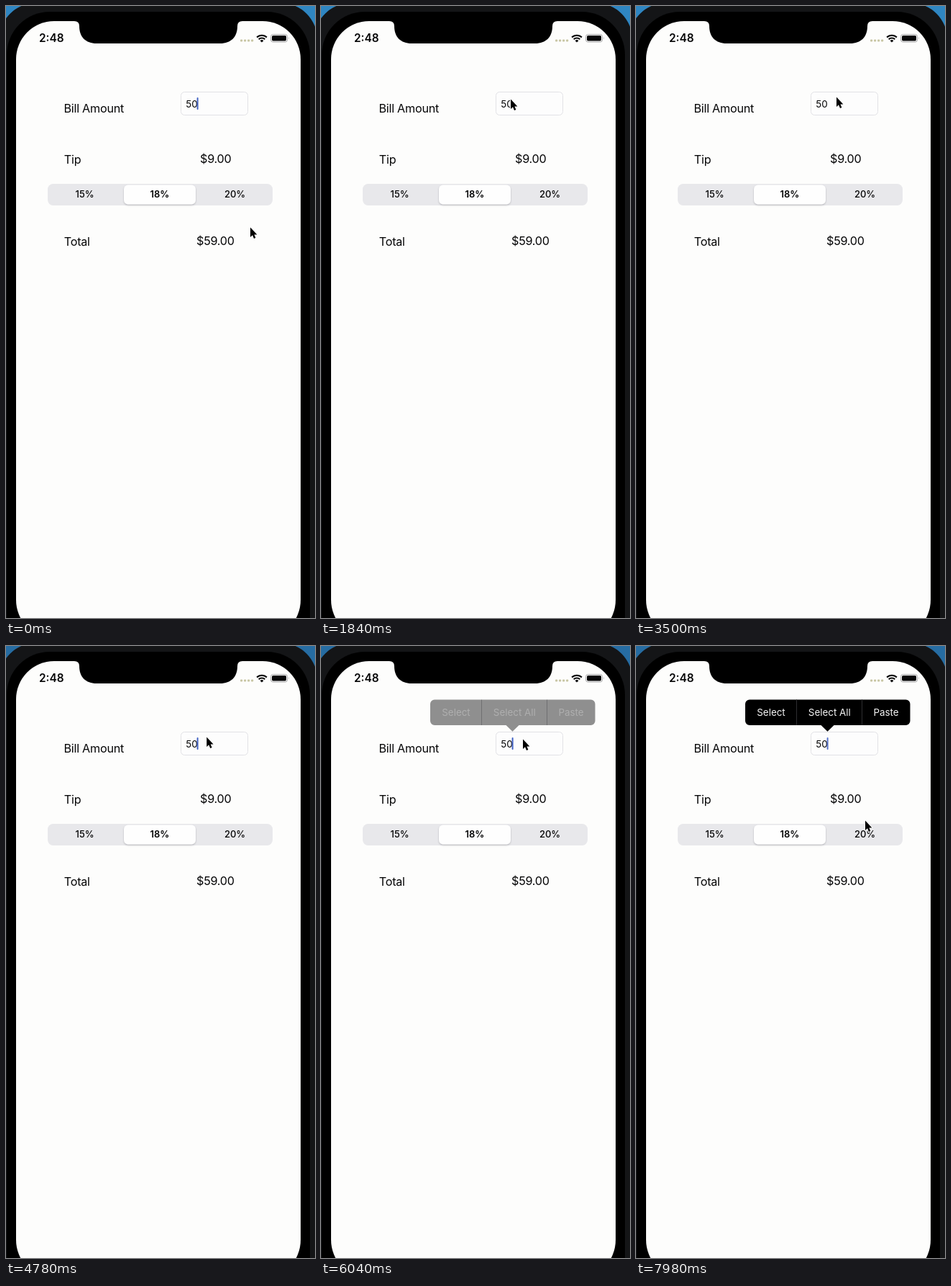
Recreate the animation shown at these times as an HTML page. Size 430x850 px, loop 8 s.

```html
<!DOCTYPE html>
<html lang="en">
<head>
<meta charset="utf-8">
<title>Tip calculator</title>
<style>
  html, body { margin: 0; width: 100%; height: 100%; overflow: hidden; background: #000; }
  svg { display: block; width: 430px; height: 850px; }
  text { font-family: Inter, Roboto, "Liberation Sans", sans-serif; fill: #050506; }
  .label { font-size: 16.2px; letter-spacing: -.26px; }
  .seg { font-size: 13px; font-weight: 500; text-anchor: middle; }
  .seg.on { font-weight: 600; }
  .small { font-size: 13.4px; }
  .clock { font-size: 15.4px; font-weight: 600; }
  #menuText text { fill: #f4f4f4; text-anchor: middle; }
</style>
</head>
<body>
<svg viewBox="0 0 430 850">
  <defs>
    <radialGradient id="glow">
      <stop offset="0" stop-color="#f1f1f5"/>
      <stop offset="1" stop-color="#fdfdfc" stop-opacity="0"/>
    </radialGradient>
    <filter id="lift" x="-10%" y="-20%" width="120%" height="150%">
      <feDropShadow dx="0" dy="1.2" stdDeviation=".8" flood-color="#50505a" flood-opacity=".35"/>
    </filter>
  </defs>

  <!-- device -->
  <rect id="desk" width="430" height="850"/>
  <rect x="-9" y="-4" width="442" height="920" rx="50" fill="#141517"/>
  <rect x="1" y="8" width="422" height="900" rx="60" fill="#000"/>
  <rect x="14" y="21" width="396" height="857" rx="53" fill="#fdfdfc"/>
  <path d="M95 20V21Q102 21 102 28C102 43 111 52 126 52H298C313 52 322 43 322 28Q322 21 329 21V20Z"/>

  <!-- status bar -->
  <text class="clock" x="46" y="50.3">2:48</text>
  <g fill="#c8c6a4">
    <rect x="326" y="46.5" width="3.2" height="3" rx="1"/>
    <rect x="331" y="46.5" width="3.2" height="3" rx="1"/>
    <rect x="336" y="46.5" width="3.2" height="3" rx="1"/>
    <rect x="341" y="46.5" width="3.2" height="3" rx="1"/>
  </g>
  <g fill="none" stroke="#050506" stroke-width="2.1">
    <path d="M349.1 43.6A9.8 9.8 0 0 1 362.9 43.6"/>
    <path d="M351.7 46.3A6.1 6.1 0 0 1 360.3 46.3"/>
    <path d="M353.6 48.2A3.4 3.4 0 0 1 358.4 48.2L356 50.6Z" fill="#050506" stroke="none"/>
  </g>
  <rect x="368.5" y="39.5" width="23" height="10.5" rx="3" fill="none" stroke="#a8a8aa"/>
  <rect x="370" y="41" width="20" height="7.5" rx="1.7" fill="#050506"/>
  <path d="M393 43Q394.6 44.7 393 46.5Z" fill="#a8a8aa"/>

  <!-- form -->
  <ellipse id="press" cx="267" cy="129" rx="52" ry="40" fill="url(#glow)" opacity="0"/>
  <text class="label" x="80.5" y="147.8">Bill Amount</text>
  <text class="label" x="80.8" y="218.5">Tip</text>
  <text class="label" x="80.8" y="333">Total</text>
  <text class="label" x="270" y="218.3">$9.00</text>
  <text class="label" x="265" y="332.3">$59.00</text>

  <rect x="243.5" y="119.5" width="93" height="32" rx="5" fill="#fdfdfd" stroke="#e2e2e6"/>
  <text class="small" x="250.2" y="140.5">50</text>
  <rect id="caret" x="265.6" y="127" width="2" height="17" rx="1" fill="#4262c4"/>

  <rect x="58" y="247" width="313" height="30" rx="7.5" fill="#e8e8eb"/>
  <rect x="164" y="248.5" width="100" height="27" rx="6" fill="#fefefe" filter="url(#lift)"/>
  <text class="seg" x="109.7" y="266.4">15%</text>
  <text class="seg on" x="214" y="266.4">18%</text>
  <text class="seg" x="318.6" y="266.4">20%</text>

  <!-- edit menu -->
  <path id="menu" opacity="0" d="M158 74.5H375.5a6 6 0 0 1 6 6V104a6 6 0 0 1-6 6H275.5L266.5 118.8L257.5 110H158a6 6 0 0 1-6-6V80.5a6 6 0 0 1 6-6Z"/>
  <g id="menuText" opacity="0">
    <path d="M223.5 74.5V110M314.5 74.5V110" stroke="#2e2e30"/>
    <text class="small" x="188" y="97.2">Select</text>
    <text class="small" x="269.3" y="97.2">Select All</text>
    <text class="small" x="348" y="97.2">Paste</text>
  </g>

  <path id="pointer" d="M0 .5V14L3 11.3L5 16L7.4 15L5.4 10.4H9.4Z"
        fill="#000" stroke="#fff" stroke-width="2" paint-order="stroke" stroke-linejoin="round"/>
</svg>
<script>
const LOOP = 8000, BLINK = 840;
const el = id => document.getElementById(id);
const ramp = (t, a, b) => Math.min(1, Math.max(0, (t - a) / (b - a)));
const ease = k => k * k * (3 - 2 * k);

// time, x, y of the pointer tip
const path = [
  [20, 340, 307], [820, 264, 137], [980, 251, 126], [1420, 250, 125],
  [1840, 264, 129], [2160, 282, 130], [3060, 285, 130], [3480, 279, 126],
  [4640, 279, 126], [5300, 281, 126], [5700, 281, 126], [6000, 281, 129],
  [6500, 281, 130], [7260, 281, 130], [7920, 319, 242]
];

function pointerAt(t) {
  const i = path.findIndex(p => p[0] > t);
  if (i === 0) return path[0].slice(1);
  if (i < 0) return path[path.length - 1].slice(1);
  const [a, b] = [path[i - 1], path[i]];
  const k = ease(ramp(t, a[0], b[0]));
  return [a[1] + (b[1] - a[1]) * k, a[2] + (b[2] - a[2]) * k];
}

function caretAt(t) {
  if (t > 5440 && t < 6400) return 1; // steady while touched
  const p = t % BLINK;
  return p < 280 ? 1 - ramp(p, 0, 140) : ramp(p, 280, 440);
}

function draw(t) {
  const [x, y] = pointerAt(t);
  const shown = ramp(t, 5900, 6225);
  el('pointer').setAttribute('transform', `translate(${x} ${y})`);
  el('caret').setAttribute('opacity', caretAt(t));
  el('menu').setAttribute('opacity', shown);
  el('menuText').setAttribute('opacity', shown ** 1.4);
  el('press').setAttribute('opacity', ramp(t, 5380, 5460) * (1 - ramp(t, 5500, 5620)));
  el('desk').setAttribute('fill', t < 4780 ? '#2f86c2' : '#266ca2');
}

const start = performance.now();
function tick() {
  draw((performance.now() - start) % LOOP);
  requestAnimationFrame(tick);
}
tick();
</script>
</body>
</html>
```
